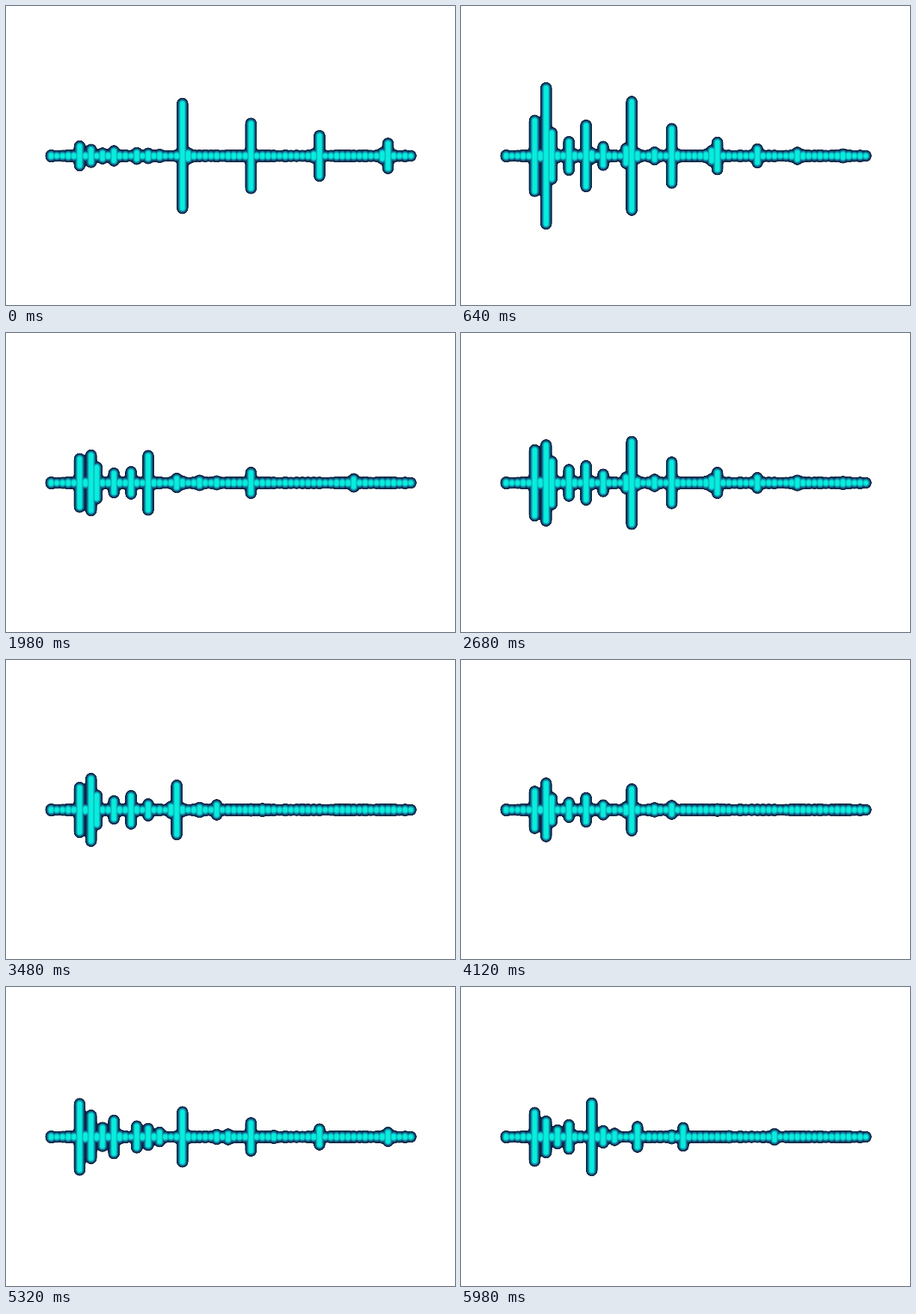
Write an HTML page that moves like this. It is 600 px wide and 400 px high and loops after 6 s.

```html
<!DOCTYPE html>
<html lang="en">
<head>
<meta charset="utf-8">
<title>Audio spectrum</title>
<style>
  html, body { margin: 0; width: 100%; height: 100%; overflow: hidden; background: #fff; }
  svg { display: block; width: 600px; height: 400px; }
  path { fill: none; stroke-linecap: round; }
</style>
</head>
<body>
<svg id="stage" viewBox="0 0 600 400">
  <!-- Blurs the rim and cuts it off again, so that close bars flow together. -->
  <filter id="merge" filterUnits="userSpaceOnUse" x="0" y="0" width="600" height="400"
      color-interpolation-filters="sRGB">
    <feGaussianBlur stdDeviation="1.8"/>
    <feComponentTransfer><feFuncA type="linear" slope="10" intercept="-3.3"/></feComponentTransfer>
  </filter>
</svg>
<script>
const LOOP = 6000, BARS = 64, LEFT = 60.3, STEP = 7.63, MID = 200.5;
const ROOT = 5.92, ATTACK = 50, LAYERS = 12;

// A tone is heard at whole multiples of its pitch; each overtone is weaker by `fall`.
const tone = (ratio, level, fall, first = 1) => ({ pitch: ROOT * ratio, level, fall, first });
const major = level => [tone(1, level, 0.4), tone(5 / 4, level * 1.15, 0.4), tone(3 / 2, level * 0.65, 0.4)];
const fourth = level => [tone(1, level, 0.5), tone(4 / 3, level * 0.65, 0.5), tone(5 / 3, level * 0.28, 0.5)];
const third = (level, over, fall) => [tone(5 / 4, level, 0.45), tone(5 / 4, over, fall, 3)];
const octave = (level, fall) => tone(2, level, fall, 2);

const beat = (at, fade, ...tones) => ({ at, fade, reach: spectrum(tones.flat()) });
const beats = [
  beat(-50, 1000, fourth(13), octave(70, 0.62)),
  beat(560, 900, major(49), third(94, 75, 0.5)),
  beat(1172, 700, major(45), third(86, 69, 0.5)),
  beat(1800, 600, major(40), tone(3, 45, 0.38)),
  beat(2440, 214, major(107), third(123, 134, 0.5)),
  beat(3075, 690, major(50), third(70, 55, 0.2)),
  beat(3770, 690, major(38), third(55, 43, 0.2)),
  beat(4350, 440, fourth(92), octave(74, 0.56)),
  beat(4970, 600, fourth(73), octave(55, 0.56)),
  beat(5560, 2260, fourth(38), tone(8 / 3, 53, 0.27), tone(4, 16, 0.3))
];

// Heights of all bars above the resting line; a partial spills into the nearer neighbour.
function spectrum(tones) {
  const reach = new Array(BARS).fill(0);
  const raise = (bar, height) => { reach[bar] = Math.max(reach[bar], height); };
  for (const { pitch, level, fall, first } of tones) {
    for (let k = first; pitch * k < BARS - 1; k++) {
      const bar = Math.floor(pitch * k), offset = pitch * k - bar - 0.5;
      const height = level * fall ** (k - first);
      raise(bar, height);
      raise(bar + Math.sign(offset), height * Math.abs(offset) * Math.min(1, k * 0.15));
    }
  }
  return reach;
}

const clamp = v => Math.min(1, Math.max(0, v));
const mix = (a, b, p) => a + (b - a) * p;
const ripple = i => Math.abs(Math.sin(i * i + 2));

function loudness(i, time) {
  const { at, fade } = beats[i];
  const end = i + 1 < beats.length ? beats[i + 1].at + ATTACK : Infinity;
  const age = time - at - ATTACK;
  return clamp(1 + age / ATTACK) * Math.exp(-Math.max(0, age) / fade) * clamp((end - time) / ATTACK);
}

// Colours from the dark rim to the bright core, by position across the stroke.
const shades = [[0, [15, 34, 62]], [0.25, [18, 66, 104]], [0.5, [18, 118, 152]],
  [0.75, [14, 186, 194]], [1, [8, 238, 220]]];

function shade(p) {
  const k = Math.max(1, shades.findIndex(s => s[0] >= p));
  const [p0, from] = shades[k - 1], [p1, to] = shades[k];
  return `rgb(${from.map((c, j) => Math.round(mix(c, to[j], (p - p0) / (p1 - p0))))})`;
}

const stage = document.getElementById('stage');
const layers = Array.from({ length: LAYERS }, (_, k) => {
  const path = document.createElementNS('http://www.w3.org/2000/svg', 'path');
  const p = k / (LAYERS - 1);
  path.setAttribute('stroke', shade(p));
  path.setAttribute('stroke-width', mix(14.8, 5, p));
  stage.append(path);
  return path;
});
layers[0].setAttribute('filter', 'url(#merge)');

function render(time) {
  const gains = beats.map((_, i) => loudness(i, time));
  let d = '';
  for (let i = 0; i < BARS; i++) {
    const reach = Math.max(ripple(i), ...beats.map((b, j) => b.reach[i] * gains[j]));
    d += `M${(LEFT + STEP * i).toFixed(2)} ${(MID - reach).toFixed(2)}v${(2 * reach + 0.02).toFixed(2)}`;
  }
  layers.forEach(path => path.setAttribute('d', d));
}

const start = performance.now();
function tick() {
  const time = (performance.now() - start) % LOOP;
  render(Math.floor(time / 20) * 20);
  requestAnimationFrame(tick);
}
tick();
</script>
</body>
</html>
```
